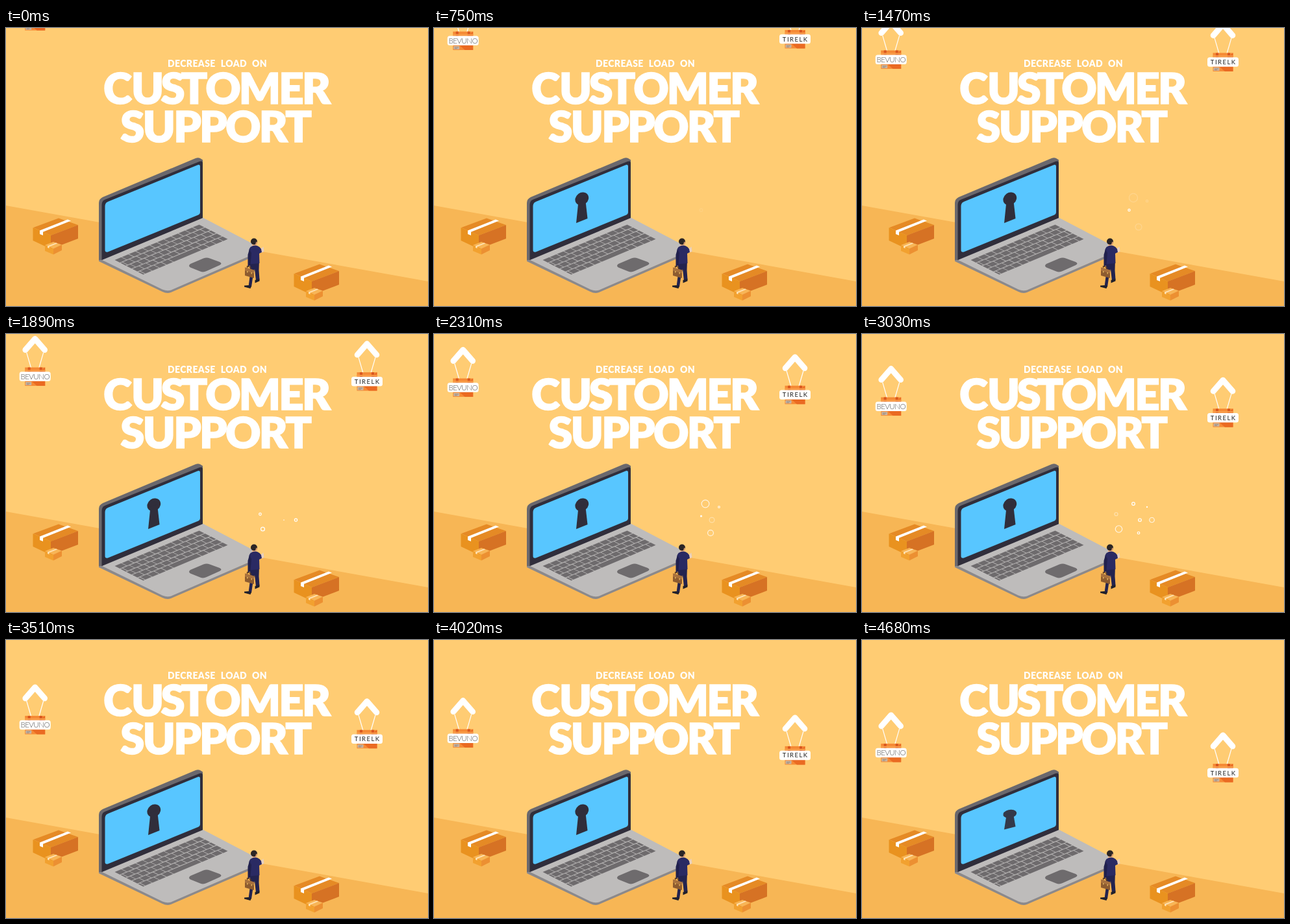
An HTML page that plays this animation: 650x429 px, repeating every 4710 ms.

```html
<!DOCTYPE html>
<html lang="en">
<head>
<meta charset="utf-8">
<title>Decrease load on customer support</title>
<style>
html, body { margin: 0; width: 100%; height: 100%; overflow: hidden; background: #ffcc73; }
svg { display: block; width: 100vw; height: 100vh; }
text { font-family: Lato, Inter, sans-serif; }
.title { fill: #fff; font-weight: 900; text-anchor: middle; }
.big { font-size: 67px; stroke: #fff; stroke-width: 1.5px; }
.tag { font-size: 11.5px; text-anchor: middle; }
</style>
</head>
<body>
<svg viewBox="0 0 650 429" xmlns="http://www.w3.org/2000/svg">
  <defs>
    <g id="parcels">
      <path fill="#e58a25" d="M42 308 81 293.500 111 304 69 320Z"/>
      <path fill="#e9921f" d="M41.500 308 69 320V341L41.500 328Z"/>
      <path fill="#d67224" d="M69 320 111 304V325L69 341Z"/>
      <path fill="#fff" d="M52 312.500 95 295.500 100 297.500 57 314.800V320L52 318Z"/>
      <path fill="#f8b556" d="M60 335 73 330 86 334.500 73 340.500Z"/>
      <path fill="#f2a12f" d="M60 335 73 340.500V349.500L60 344Z"/>
      <path fill="#ec9032" d="M73 340.500 86 334.500V343L73 349.500Z"/>
      <path fill="#ffe3b5" d="M64 336.500 77 331.500 79.500 332.300 66.500 337.600V340L64 339Z"/>
    </g>
    <g id="drop">
      <path fill="none" stroke="#fff" stroke-width="1.200" d="M-13-37-6-13M13-37 6-13"/>
      <path fill="none" stroke="#fff" stroke-width="9" stroke-linecap="round" stroke-linejoin="round" d="M-14.800-41 0-58 14.800-41"/>
      <rect x="-15.500" y="-14" width="31" height="28.500" fill="#f58a35"/>
      <path fill="#ea6a22" d="M15.500-14V14.500H3L-8 5Z"/>
      <path fill="#d9571f" d="M-11-14h4v7h-4zM7-14h4v7h-4z"/>
      <path fill="#f9a04c" d="M-15.500-10h31v2h-31z"/>
      <rect x="-14.500" y="8.500" width="9" height="5" fill="#c9b6a3"/>
      <path stroke="#8f8177" stroke-width=".8" d="M-13 10.500h6M-13 12.200h4"/>
      <rect x="-24" y="-7.200" width="48" height="14.500" rx="3.500" fill="#fff"/>
    </g>
  </defs>

  <rect width="650" height="429" fill="#ffcc73"/>
  <path fill="#f7b655" d="M0 274 650 391V429H0Z"/>

  <text class="title" x="325.500" y="59.500" font-size="14" letter-spacing=".4" word-spacing="4.300">DECREASE LOAD ON</text>
  <text class="title big" x="172 218 257 290 334.500 391 439.500 478" y="117">CUSTOMER</text>
  <text class="title big" x="322.300" y="176" letter-spacing="-2.700">SUPPORT</text>

  <use href="#parcels"/>
  <use href="#parcels" x="402" y="71"/>

  <g id="laptop">
    <path fill="#8b898b" d="M143 355 246 404 Q250 405 254 404L388 346V350L254 408Q248 410.500 241 407L143 360Z"/>
    <path fill="#bebcbb" d="M146 357 303 292.500 386 336Q394 341 386 347L254 404.500Q248 406.500 241 403.500Z"/>
    <path fill="#6a686d" d="M143 358V270Q143 264 149 261L292 201Q296 199.500 299 201L303 203.500V293L148 358Z"/>
    <path fill="#302e3b" d="M147.500 358V273Q147.500 267 152 265L298 206Q303 204 303 209V293Z"/>
    <path fill="#58c6ff" d="M152.500 342V275Q152.500 270 157 268L295 211.500Q299 210 299 214V284Q299 287 296 288.500L157 345.500Q152.500 347 152.500 342Z"/>
    <g id="keys" fill="#6e6b6d" transform="matrix(131 -55 45 23 167.500 358)"/>
    <path fill="#6e6b6d" d="M284 364 304 355.500Q309 353.500 314 355.500L329 361Q334 363.500 329 366L309 375Q304 377.500 299 375.500L284 369.500Q280 367 284 364Z"/>
    <g id="hole" fill="#302e3b">
      <ellipse cx="227.800" cy="263.500" rx="11" ry="9.300" transform="rotate(-38 227.800 263.500)"/>
      <path d="M222.500 267 233 263 236.500 294 219 301Z"/>
    </g>
  </g>

  <g id="man">
    <path fill="#23234f" d="M376 360 390 358 389.500 374 390.500 388 385 390 383 372 380 386 378 399.500 373.500 399 375.500 384Z"/>
    <path fill="#20202b" d="M383.500 389 390.500 387V390.500L383.500 393.500ZM373 397 378 398 376.500 402 367 399.500V397.500Z"/>
    <path fill="#f0b98d" d="M379 333h6v5h-6z"/>
    <path fill="#e9d0bd" d="M391.500 341 396.500 337.500 397.500 345 392 347Z"/>
    <path fill="#2a2a63" d="M376.500 338Q382 334.500 387 336 391 337.500 393 341L394 346 390 348 390.500 363 376 364.500 374 362 374.500 344Q374.500 340 376.500 338Z"/>
    <path fill="#20204d" d="M375 341 378 347 376.500 366 372.500 369 372.500 350Z"/>
    <circle cx="382" cy="329.500" r="5" fill="#2b2525"/>
    <path fill="#d99a6c" d="M385.500 329.500 387 331 386 334.500 383.500 335Z"/>
    <path fill="none" stroke="#5d3a1d" stroke-width="1.200" d="M371.500 370.500V367.500L377 369.500V372"/>
    <path fill="#8d5b2f" d="M368 369.500 382 373.500V386L368 382Z"/>
    <path fill="#a8713d" d="M368 369.500 382 373.500V378.500L368 374.500Z"/>
    <path fill="#e2b15c" d="M371 375h1.500v2.500h-1.500zM377.500 377h1.500v2.500h-1.500z"/>
  </g>

  <g id="bubbles" fill="none" stroke="#fff" stroke-width="1.200"></g>

  <g id="left"><use href="#drop"/><text class="tag" x="0" y="4.200" font-weight="300" fill="#555" letter-spacing="-.5">BEVUNO</text></g>
  <g id="right"><use href="#drop"/><text class="tag" x=".7" y="3.600" style="font-size:9.500px" fill="#222" letter-spacing="1.500">TIRELK</text></g>
</svg>
<script>
const LOOP = 4710, STEP = 30, PERIOD = 960, LIFE = 520;
const $ = id => document.getElementById(id);
const clamp = v => Math.max(0, Math.min(1, v));

function add(parent, tag, attrs) {
  const el = document.createElementNS('http://www.w3.org/2000/svg', tag);
  for (const k in attrs) el.setAttribute(k, attrs[k]);
  parent.appendChild(el);
  return el;
}

// Keyboard: five staggered rows in a skewed unit square
function addKey(row, from, to) {
  const a = clamp(from), b = clamp(to);
  if (b - a > 0.02) add($('keys'), 'rect', { x: a, y: row / 5, width: b - a - 0.007, height: 0.175 });
}
for (let row = 0; row < 5; row++) {
  const count = 12, shift = (row % 3) * 0.025;
  for (let i = -1; i < count; i++) {
    if (row === 4 && i > 3 && i < 8) continue;
    addKey(row, i / count + shift, (i + 1) / count + shift);
  }
}
addKey(4, 4 / 12 + 0.025, 8 / 12 + 0.025);

// x, y, full radius, first birth, number of puffs
const bubbles = [
  [418, 262, 6.6, 30, 4],
  [426, 307, 5, 30, 4],
  [439, 267, 1.6, 30, 4],
  [411.5, 281, 2.3, 250, 3],
  [428, 287, 4, 910, 3],
  [395.5, 301, 6, 760, 3],
  [446.5, 287, 4.3, 760, 3],
  [391.5, 278, 2.6, 1640, 2]
].map(([x, y, r, birth, puffs]) => ({ r, birth, puffs, el: add($('bubbles'), 'circle', { cx: x, cy: y }) }));

function drawBubble({ r, birth, puffs, el }, t) {
  const n = Math.floor((t - birth) / PERIOD);
  const p = (t - birth - n * PERIOD) / LIFE;
  const on = n >= 0 && n < puffs && p < 1;
  el.setAttribute('r', on ? r * Math.sin(p * Math.PI / 2) : 0);
  el.setAttribute('opacity', on ? clamp((1 - p) / 0.4) : 0);
}

// Steady fall that slows down near the end
function place(id, x, y, speed, drag, t) {
  const late = Math.max(0, t - 4350);
  const top = y + speed * (t - 750) - drag * late * late;
  $(id).setAttribute('transform', `translate(${x} ${top})`);
}

function drawHole(t) {
  const open = 1 - (1 - clamp((t - 30) / 270)) ** 2;
  const close = clamp((t - 4500) / 180) ** 2;
  const s = open * (1 - 0.35 * close);
  $('hole').setAttribute('transform', `translate(0 ${277 * (1 - s)}) scale(1 ${s})`);
  $('hole').setAttribute('opacity', s > 0 ? 1 - 0.08 * close : 0);
}

function draw(now) {
  const t = Math.floor((now % LOOP) / STEP) * STEP;
  place('left', 44.7, 19.5, 0.0404, 4e-5, t);
  place('right', 556, 17, 0.0492, 4.9e-5, t);
  drawHole(t);
  bubbles.forEach(b => drawBubble(b, t));
}

let start;
function tick(now) {
  start ??= now;
  draw(now - start);
  requestAnimationFrame(tick);
}
draw(0);
requestAnimationFrame(tick);
</script>
</body>
</html>
```
